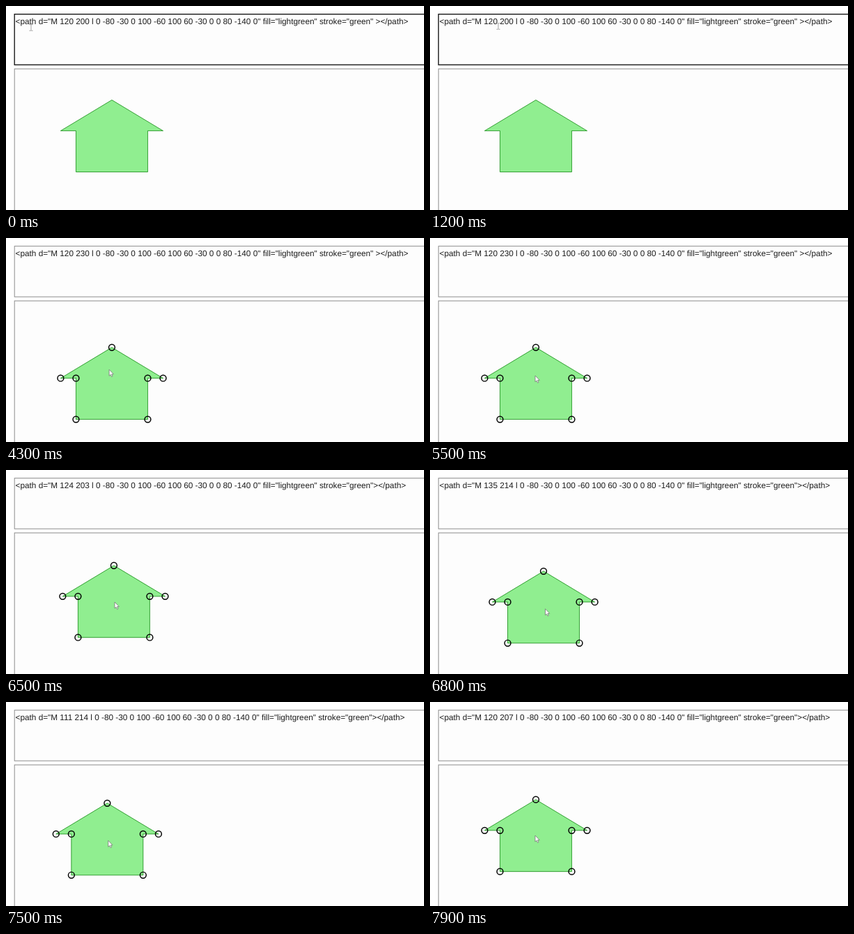
An HTML page for the animation above (8 s loop, 600 px wide and 292 px high).

```html
<!DOCTYPE html>
<html lang="en">
<head>
<meta charset="utf-8">
<title>Path editor</title>
<style>
  html, body { margin: 0; width: 100%; height: 100%; overflow: hidden; background: #fff; }
  svg { display: block; width: 600px; height: 292px; }
  text { font: 11.77px "Liberation Sans", Arial, sans-serif; fill: #1c1c1c; text-rendering: geometricPrecision; white-space: pre; }
  .panel { fill: #fdfdfd; stroke: #8c8c8c; }
  .panel.focus { stroke: #1a1a1a; stroke-width: 1.4; }
  #handles { fill: none; stroke: #000; stroke-width: 2; }
  #beam { fill: none; stroke: #999; stroke-width: .9; }
  #arrow { fill: #fff; stroke: #777; stroke-width: .8; }
</style>
</head>
<body>
<svg viewBox="0 0 600 292">
  <rect id="editor" class="panel" x="12.2" y="11.7" width="600" height="72.5"/>
  <rect class="panel" x="12.2" y="90" width="600" height="220"/>
  <rect id="selection" x="106.8" y="14.5" width="6.6" height="16" fill="#2f8ffb"/>
  <text x="13.6" y="26.2"><tspan id="head"></tspan><tspan id="digit"></tspan><tspan id="tail"></tspan></text>
  <g transform="translate(12.2 90.4) scale(.7355)">
    <path id="house" fill="lightgreen" stroke="green"/>
    <g id="handles"></g>
  </g>
  <path id="beam" d="M-2.5-4.3h2l.5.5.5-.5h2M0-3.8v7.6M-2.5 4.3h2l.5-.5.5.5h2"/>
  <path id="arrow" d="M0 0v9l2-1.8 1.5 3.1 1.4-.7-1.4-3h2.8z"/>
</svg>
<script>
const LOOP = 8000, STEP = 100;
const TYPE = 3300, CLICK = 4300, DRAG = 5500;
const SCALE = .7355, LEFT = 12.2, TOP = 90.4;
const SEGMENTS = "0 -80 -30 0 100 -60 100 60 -30 0 0 80 -140 0";
const $ = id => document.getElementById(id);

// Keys are [time, x, y].
const pointerKeys = [
  [0, 36, 31], [800, 64, 31], [900, 64, 31], [1200, 98, 29], [1800, 108, 27],
  [2400, 117, 27], [3400, 117, 27], [4100, 148, 188], [4200, 148, 188], [5100, 151, 197]
];
const dragKeys = [
  [5500, 120, 230], [5700, 104, 220], [6000, 68, 203], [6300, 104, 191],
  [6500, 124, 203], [6700, 136, 221], [6900, 133, 207], [7100, 123, 193],
  [7300, 108, 199], [7500, 111, 214], [7700, 125, 213], [7900, 120, 207]
];
const gripKeys = [
  [5500, 50.5, -62.6], [5800, 52, -51], [6500, 52.6, -50.7], [7100, 55.3, -47.4], [7900, 50.5, -51.6]
];

function sample(keys, t) {
  const i = keys.findIndex(k => k[0] > t);
  if (i === 0) return keys[0].slice(1);
  if (i < 0) return keys[keys.length - 1].slice(1);
  const a = keys[i - 1], b = keys[i];
  const u = (t - a[0]) / (b[0] - a[0]), e = u * u * (3 - 2 * u);
  return [a[1] + (b[1] - a[1]) * e, a[2] + (b[2] - a[2]) * e];
}

const steps = SEGMENTS.split(" ").map(Number);
let hx = 0, hy = 0;
for (let i = 0; i < steps.length; i += 2) {
  const dot = document.createElementNS("http://www.w3.org/2000/svg", "circle");
  dot.setAttribute("cx", hx += steps[i]);
  dot.setAttribute("cy", hy += steps[i + 1]);
  dot.setAttribute("r", 6);
  $("handles").append(dot);
}

const show = (id, on) => $(id).setAttribute("visibility", on ? "visible" : "hidden");
const move = (id, x, y) => $(id).setAttribute("transform", `translate(${x} ${y})`);

function draw(t) {
  const dragging = t > DRAG;
  const [x, y] = t < TYPE ? [120, 200] : sample(dragKeys, t).map(Math.round);
  let [px, py] = sample(pointerKeys, t);
  if (dragging) {
    const [gx, gy] = sample(gripKeys, t);
    px = LEFT + x * SCALE + gx;
    py = TOP + y * SCALE + gy;
  }

  const selected = t >= 2200 && t < TYPE;
  const value = String(y);
  $("head").textContent = `<path d="M ${x} ${value[0]}`;
  $("digit").textContent = value[1];
  $("digit").style.fill = selected ? "#fff" : "";
  $("tail").textContent = `${value[2]} l ${SEGMENTS}" fill="lightgreen" stroke="green"${dragging ? "" : " "}></path>`;
  show("selection", selected);

  $("editor").classList.toggle("focus", t < CLICK);
  $("house").setAttribute("d", `M ${x} ${y} l ${SEGMENTS}`);
  show("handles", t >= CLICK);
  move("handles", x, y);

  const overText = py < 84;
  show("beam", overText);
  show("arrow", !overText);
  move(overText ? "beam" : "arrow", px, py);
}

function tick() {
  draw(Math.floor(performance.now() % LOOP / STEP) * STEP);
  requestAnimationFrame(tick);
}
tick();
</script>
</body>
</html>
```
